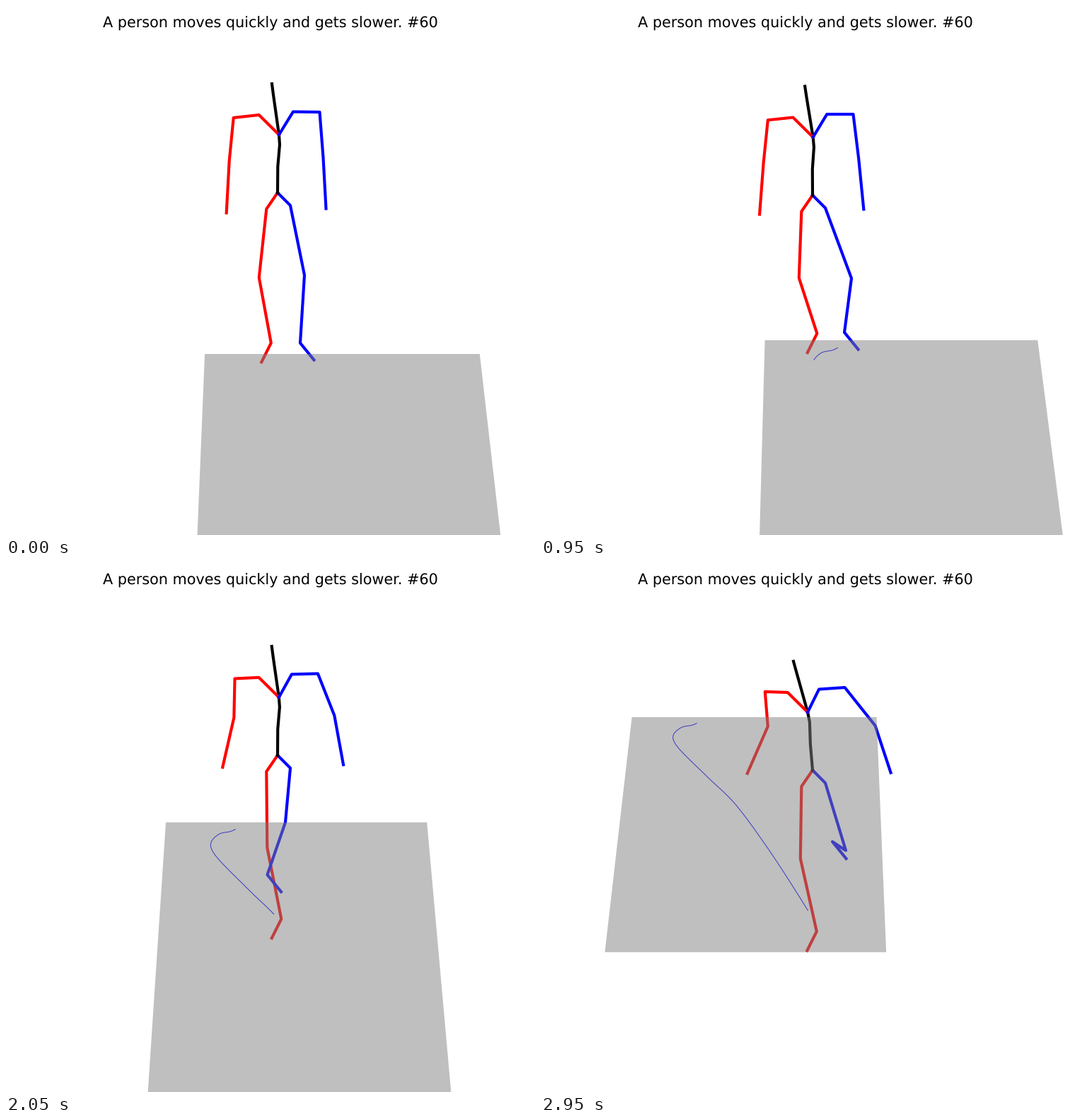
A matplotlib script for the animation above (3 s loop, 748 px wide and 748 px high).

```python
import numpy as np
import matplotlib.pyplot as plt
from matplotlib.animation import FuncAnimation

SIZE, DPI, FRAMES, STEP = 748, 64, 60, 50
PT = 72 / DPI  # points per pixel
plt.rcParams["text.hinting"] = "none"

# Perspective: the floor's width in pixels is linear in screen y,
# and its inverse is linear in depth.
CX, WIDTH0, SLOPE = 383.5, 312.0, 0.156
FLOOR_DEPTH = 3.766e-4
ROOT_U, ROOT_Y = 0.003, 503

n = np.arange(FRAMES)
u = n / (FRAMES - 1)
stride = np.cos(2 * np.pi * (n - 41) / 18)  # peaks when the right foot lands
pump = u ** 2                               # arms swing wider as speed grows
lean = (2.5 * np.minimum(1, n / 19) * np.cos(2 * np.pi * (n - 34) / 30)
        - 18 * u ** 10)


def depth(y):
    return 1 / (WIDTH0 + SLOPE * y)


def project(x, q):
    w = 1 / q
    return CX + x * w, (w - WIDTH0) / SLOPE


def track(keys):
    """Smooth Hermite curve through {frame: values}, held before the first key."""
    f = np.array(list(keys), float)
    v = np.array(list(keys.values()), float)
    m = np.gradient(v, f, axis=0)
    t = np.clip(n, f[0], f[-1])
    k = np.clip(np.searchsorted(f, t, side="right") - 1, 0, len(f) - 2)
    h = (f[k + 1] - f[k])[:, None]
    s = (t - f[k])[:, None] / h
    return ((1 + 2 * s) * (1 - s) ** 2 * v[k] + s * (1 - s) ** 2 * h * m[k]
            + s * s * (3 - 2 * s) * v[k + 1] + s * s * (s - 1) * h * m[k + 1])


def bone(rest, shift=(0, 0), swing=(0, 0)):
    """Bone vector per frame: rest pose plus a growing, swinging offset."""
    move = np.array(shift) + np.outer(stride, swing)
    return np.array(rest) + pump[:, None] * move


def chain(start, *bones):
    return np.cumsum(np.stack([start, *bones], axis=1), axis=1)


# Far left floor corner: sideways offset (in floor widths) and screen y
corner = track({
    0: (-.2635, 492), 8: (-.2432, 488.5), 14: (-.201, 484.3),
    19: (-.1736, 472.5), 25: (-.187, 455), 34: (-.320, 404),
    41: (-.4266, 366.7), 49: (-.551, 310), 59: (-.737, 218),
})
floor_u, floor_q = corner[:, 0], depth(corner[:, 1])

# The body sinks slowly, then dips and leans at the end
pelvis = np.column_stack([np.full(FRAMES, 384), 264 + 11 * u + 18 * u ** 12])
back = np.array([(0, 0), (.3, -37), (3, -68), (2, -82), (-6, -138.5), (-8, -154)])
spine = pelvis[:, None] + back
spine[:, :, 0] += np.outer(lean, (-back[:, 1] / 138.5) ** 1.2)
chest = spine[:, 3]

right_arm = chain(
    chest,
    bone((-28.3, -28)),
    bone((-36, 4), (4, -2), (0, -3)),
    bone((-6, 61), (-4, -5), (14, -7)),
    bone((-4, 73.5), (-13, -5), (-12, -2)),
)
left_arm = chain(
    chest,
    bone((20, -32.5), (-4, 0)),
    bone((37.5, .5), (-3, -5), (2, 2)),
    bone((5, 64), (23, -16), (15, 6)),
    bone((4, 72.5), (33, -6), (-15, 0)),
)

# Key steps of the run: thigh and shin vectors
right_step = track({
    4: (-10.5, 97, 17, 92.5), 19: (-3.5, 94, 25.5, 78.5),
    34: (-20.5, 99.5, 14, 41), 41: (1, 107.5, 20, 101),
    49: (-19, 79, 1.5, 59), 59: (-1.5, 102, 23, 103),
})
left_step = track({
    4: (20, 98.5, -6, 96), 19: (37, 99.5, -10, 76.5),
    34: (13.5, 105.5, -15.5, 95.5), 41: (-7, 77, -25.5, 74),
    49: (37, 100.5, -12, 69), 59: (29, 95.5, -19, -12.5),
})


def leg(hip, step, foot):
    return chain(pelvis, bone(hip), step[:, :2], step[:, 2:], bone(foot))


chains = [
    ("red", leg((-15.7, 23), right_step, (-13.5, 27))),
    ("blue", leg((18, 18), left_step, (19.5, 24))),
    ("black", spine),
    ("red", right_arm),
    ("blue", left_arm),
]

fig = plt.figure(figsize=(SIZE / DPI, SIZE / DPI), dpi=DPI, facecolor="white")
fig.suptitle("A person moves quickly and gets slower. #60",
             family="DejaVu Sans", fontsize=20.78 * PT)
ax = fig.add_axes([0, 0, 1, 1])
ax.set(xlim=(0, SIZE), ylim=(SIZE, 0))
ax.axis("off")

trail, = ax.plot([], [], color="blue", lw=1.04 * PT)
bones = [ax.plot([], [], color=c, lw=4.15 * PT, solid_joinstyle="round",
                 solid_capstyle="projecting")[0] for c, _ in chains]
floor, = ax.fill([0, 1, 1], [0, 0, 1], color=(.5, .5, .5), alpha=.5,
                 lw=0, zorder=5)


def update(i):
    left, far = floor_u[i], floor_q[i]
    us = left + np.array([0, 1, 1, 0])
    qs = far - np.array([0, 0, 1, 1]) * FLOOR_DEPTH
    floor.set_xy(np.column_stack(project(us, qs)))
    trail.set_data(*project(ROOT_U + left - floor_u[:i],
                            depth(ROOT_Y) + far - floor_q[:i]))
    for line, (_, joints) in zip(bones, chains):
        line.set_data(*joints[i].T)
    return [trail, *bones, floor]


anim = FuncAnimation(fig, update, frames=FRAMES, interval=STEP,
                     repeat=True, repeat_delay=0, blit=False)
plt.show()
```
